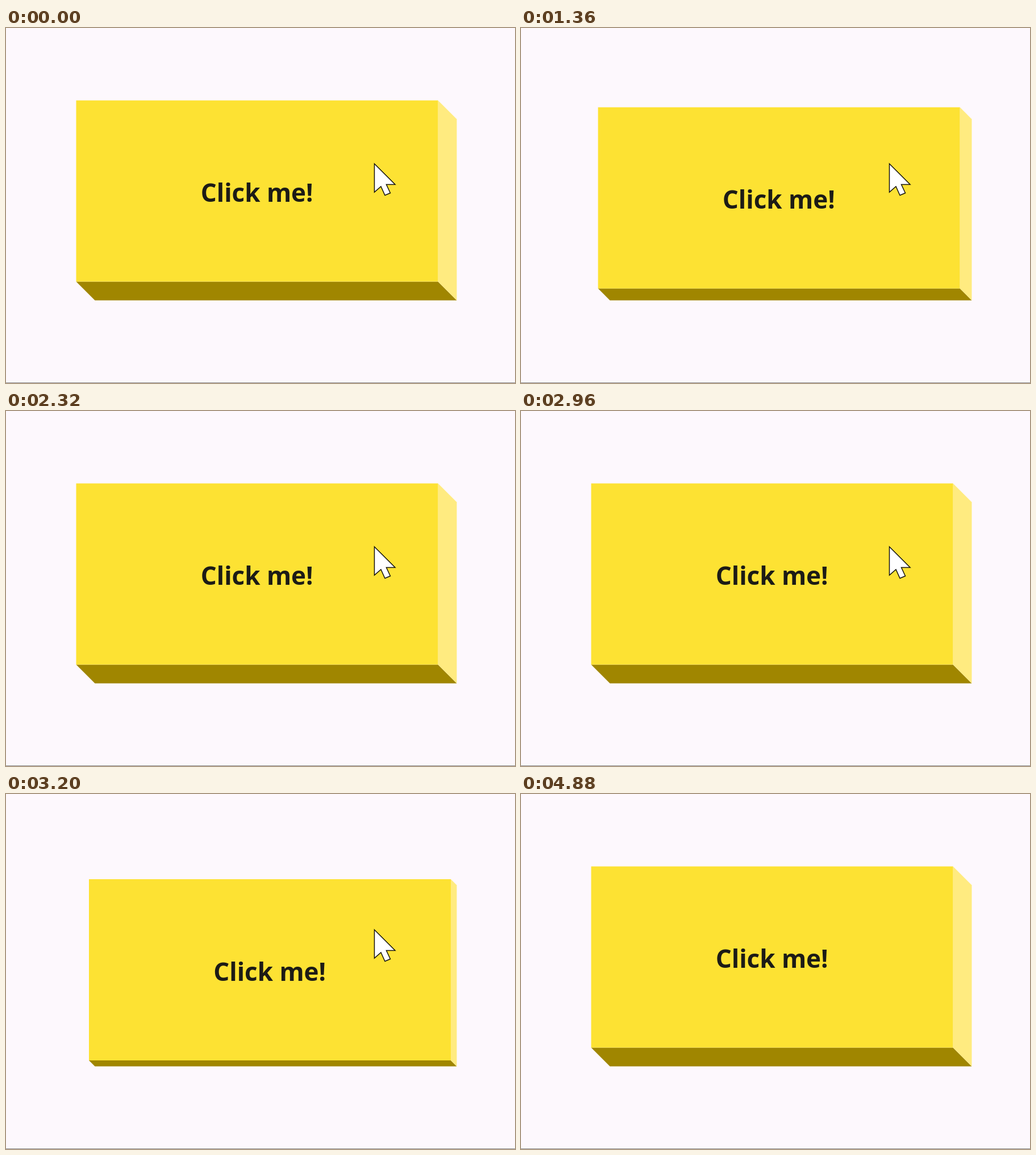
These frames come from a looping animation (896 by 625 pixels, 4.96 s). An HTML page:

```html
<!DOCTYPE html>
<html lang="en">
<head>
<meta charset="utf-8">
<title>3D button</title>
<style>
  html, body { margin: 0; width: 100%; height: 100%; overflow: hidden; background: #fdf8fd; }
  svg { display: block; width: 896px; height: 625px; }
  text { font: bold 44px "Open Sans", "Noto Sans", sans-serif; text-anchor: middle; fill: #1c1b16; }
</style>
</head>
<body>
<svg viewBox="0 0 896 625">
  <rect y="624" width="896" height="1" fill="#8c8a8c"/>
  <path id="bottom" fill="#a08600"/>
  <path id="side" fill="#ffeb80"/>
  <g id="face">
    <rect x="123.5" y="127.5" width="637" height="319" fill="#fde233"/>
    <text x="441.7" y="306">Click me!</text>
  </g>
  <path id="cursor" d="M.5 1V51L12 41L19 56.5L28.5 52.5L21.5 37.5H37Z"
        fill="#fff" stroke="#15130c" stroke-width="1.5"/>
</svg>
<script>
const LOOP = 4960, STEP = 80;
const DEPTH = 33, TRAVEL = 30;
const CLICKS = [1320, 1960, 3000];
const RELEASE_DELAY = 170, PRESS_TIME = 92;
const EXIT_START = 3400, EXIT_END = 3680;

const [bottom, side, face, cursor] =
  ["bottom", "side", "face", "cursor"].map(id => document.getElementById(id));

function smooth(x) {
  x = Math.min(1, Math.max(0, x));
  return x * x * (3 - 2 * x);
}

function pressDepth(t) {
  return CLICKS.reduce((sum, start) => sum + TRAVEL * (
    smooth((t - start) / PRESS_TIME) -
    smooth((t - start - RELEASE_DELAY) / PRESS_TIME)), 0);
}

function draw(t) {
  const d = pressDepth(t), rest = DEPTH - d;
  const left = 123.5 + d, top = 127.5 + d;
  face.setAttribute("transform", `translate(${d} ${d})`);
  bottom.setAttribute("d", `M${left} ${top + 319}h637l${rest} ${rest}h-637z`);
  side.setAttribute("d", `M${left + 637} ${top}l${rest} ${rest}v319l${-rest} ${-rest}z`);

  const exit = smooth((t - EXIT_START) / (EXIT_END - EXIT_START));
  cursor.setAttribute("transform", `translate(${648 - 21 * exit} ${238 - 119 * exit})`);
  cursor.setAttribute("visibility", t < EXIT_END + STEP ? "visible" : "hidden");
}

const begin = performance.now();
function tick() {
  const t = (performance.now() - begin) % LOOP;
  draw(Math.floor(t / STEP) * STEP);
  requestAnimationFrame(tick);
}
tick();
</script>
</body>
</html>
```
